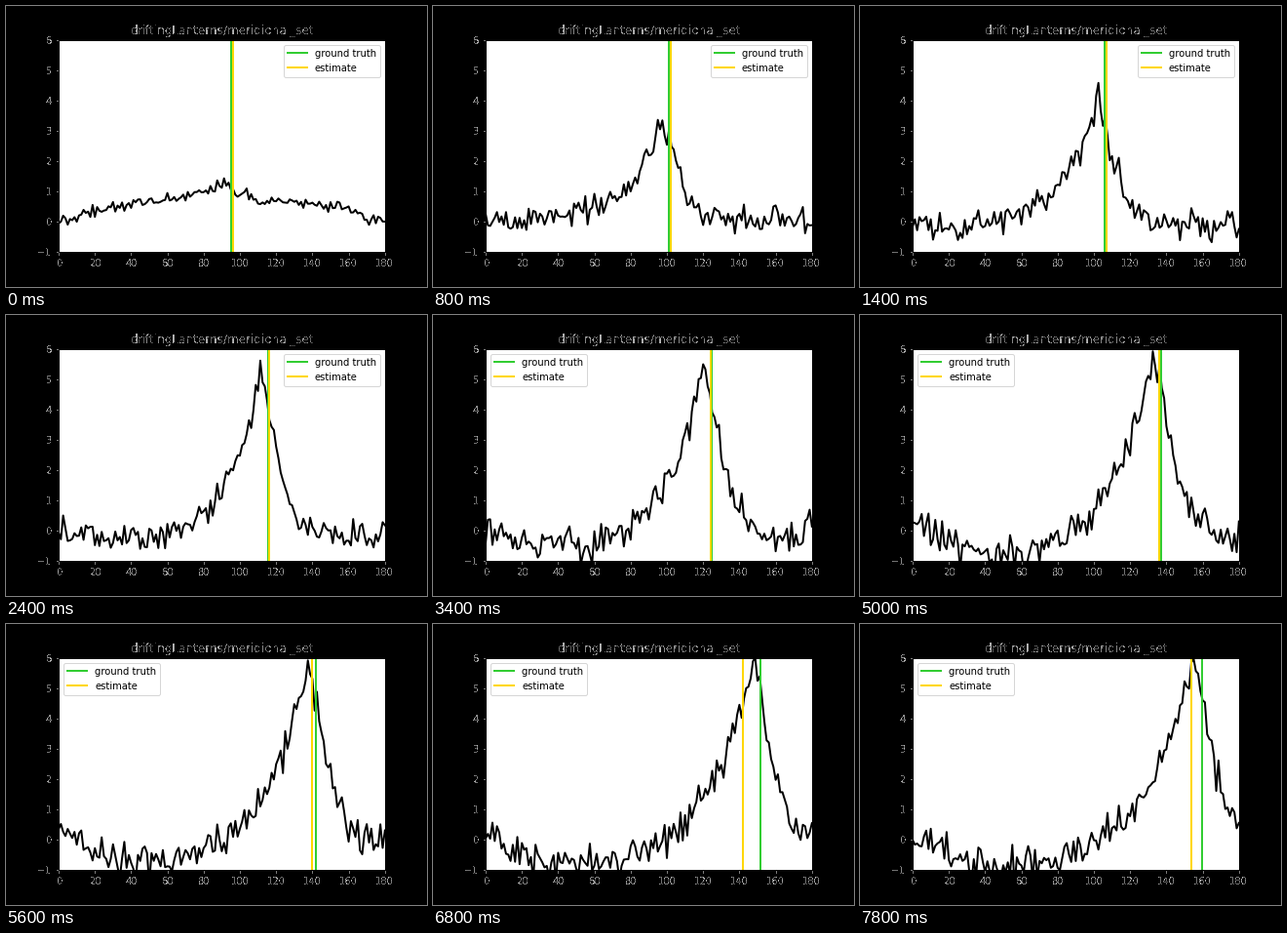
Animation of 432 by 288 pixels, one loop 8 s. Source, as a matplotlib script:

```python
import numpy as np
import matplotlib.pyplot as plt
from matplotlib.animation import FuncAnimation

FRAMES, INTERVAL = 40, 200
STEP = 1.25
ANGLES = np.arange(0, 180 + STEP / 2, STEP)

# Heading and its estimate, in degrees, at a few key times.
KEYS = [0, 7, 17, 22, 28, 34, 39]
TRUTH = [95, 106, 124.8, 132, 142, 151.6, 159.7]
ESTIMATE = [96, 107, 124, 131, 140, 142, 153.8]
LAG = 4.5


def make_noise(keep=0.6, seed=4):
    """Unit noise per frame that partly carries over to the next frame."""
    rng = np.random.default_rng(seed)
    rows = [rng.standard_normal(ANGLES.size)]
    for _ in range(FRAMES - 1):
        fresh = rng.standard_normal(ANGLES.size)
        rows.append(keep * rows[-1] + np.sqrt(1 - keep ** 2) * fresh)
    return np.clip(rows, -2.3, 2.3)


NOISE = make_noise()


def at(i, values):
    return np.interp(i, KEYS, values)


def settle(i, start, end, pace):
    """Approach end from start exponentially."""
    return end + (start - end) * np.exp(-i / pace)


def rise(distance):
    return 1 - np.exp(-(distance / 25) ** 1.5)


def activity(i):
    """A floor that sinks over time, with a growing lopsided peak on it."""
    d = ANGLES - (at(i, TRUTH) - LAG)
    floor = settle(i, 0.65, -1.1, 10) * rise(ANGLES) * rise(180 - ANGLES)
    floor = np.where(d > 0, np.maximum(floor, -0.2), floor)
    tail = np.exp(-np.abs(d) / (17 + 0.27 * i))
    front = np.exp(-(np.abs(d) / 13) ** 1.5)
    shape = np.where(d < 0, tail, front)
    peak = settle(i, 1.25, 5.9, 7.5)
    return floor + (peak - floor) * shape + settle(i, 0.1, 0.31, 5) * NOISE[i]


def hollow(image, dpi):
    """Show dark ink on black by its soft edges, mixed with white in linear light."""
    alpha = image[..., 3]
    out = np.zeros_like(image)
    out[..., :3] = ((1 - alpha) ** (1 / 2.2))[..., None]
    out[..., 3] = alpha >= 0.5
    return out, 0, 0


plt.rcParams["font.family"] = "DejaVu Sans"
plt.rcParams["font.size"] = 10
fig, ax = plt.subplots(figsize=(6, 4), dpi=72, facecolor="black")
fig.subplots_adjust(left=0.125, right=0.9, bottom=0.125, top=0.88)
ax.set_xlim(0, 180)
ax.set_ylim(-1, 6)
ax.set_xticks(range(0, 181, 20))
title = ax.set_title("driftingLanterns/meridional_set", fontsize=12)
for part in (title, ax.xaxis, ax.yaxis, *ax.spines.values()):
    part.set_agg_filter(hollow)

curve, = ax.plot(ANGLES, activity(0), color="black", lw=2)
truth = ax.axvline(TRUTH[0], color="limegreen", lw=2, label="ground truth")
estimate = ax.axvline(ESTIMATE[0], color="gold", lw=2, label="estimate")
ax.legend(loc="best", fontsize=10)


def draw(i):
    curve.set_ydata(activity(i))
    truth.set_xdata([at(i, TRUTH)] * 2)
    estimate.set_xdata([round(at(i, ESTIMATE))] * 2)
    return curve, truth, estimate


anim = FuncAnimation(fig, draw, frames=FRAMES, interval=INTERVAL,
                     init_func=lambda: draw(0), repeat=True, blit=False)
plt.show()
```
